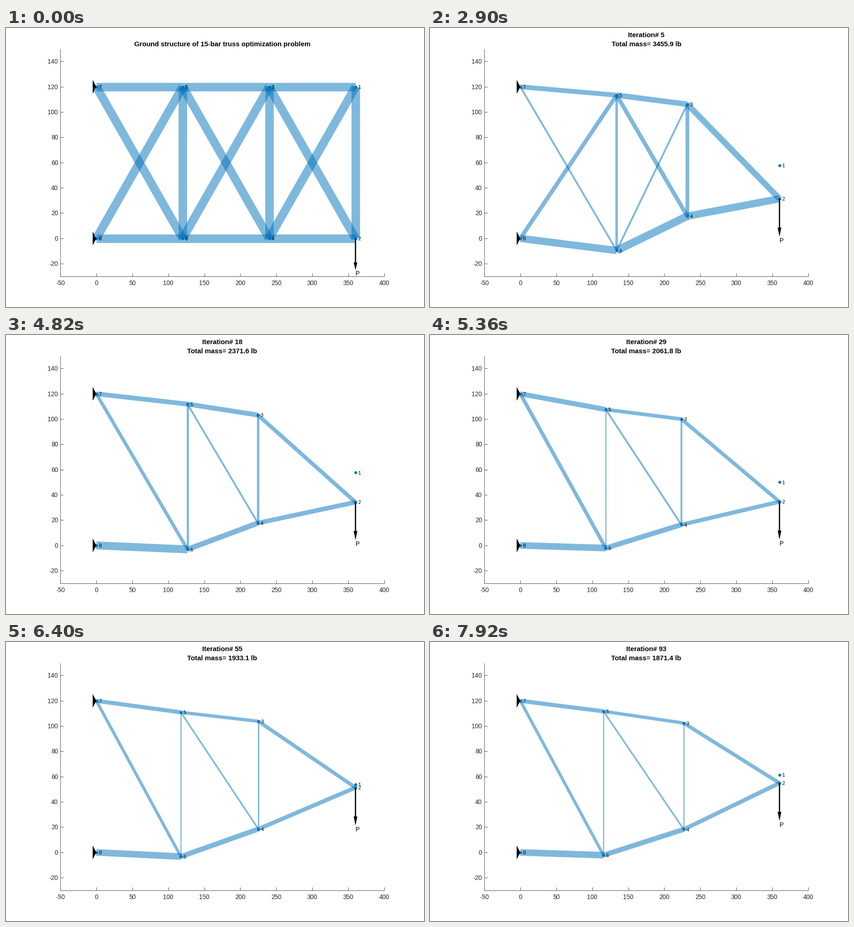
These frames come from a looping animation (916 px wide and 611 px high, 8000 ms). A matplotlib script:

```python
import numpy as np
import matplotlib.pyplot as plt
from matplotlib.animation import FuncAnimation
from matplotlib.collections import LineCollection
from matplotlib.patches import Polygon

W, H, DPI = 916, 611, 64
STEP, LOOP = 10, 8000
BLUE, GRAY = (0, 114 / 255, 189 / 255), (0.15, 0.15, 0.15)

# Plot box as fractions of the stage, and its data limits
LEFT, RIGHT = 0.13 * W, 0.905 * W
TOP, BOTTOM = 0.075 * H, 0.89 * H
X_MIN, X_MAX, Y_MIN, Y_MAX = -50, 400, -30, 150

BARS = [(7, 5), (5, 3), (8, 6), (6, 4), (4, 2), (5, 6), (3, 4), (7, 6),
        (8, 5), (5, 4), (6, 3), (3, 2), (3, 1), (1, 2), (4, 1)]

# Design stages: y1, y2, x3, y3, y4, x5, y5, y6
SHAPES = np.array([
    [50, 20, 220, 100, 20, 100, 125.3, -12],
    [57.9, 31.4, 231.9, 106.2, 17.6, 133.8, 113.4, -9.6],
    [61.8, 34, 224.8, 105, 18.4, 131, 114.2, -3.7],
    [50, 34.6, 223.7, 100, 16.4, 118.6, 107.6, -2.1],
    [53.8, 51.3, 225.1, 103.8, 18.5, 117.4, 110.9, -3.3],
    [61.3, 54.9, 227, 102.4, 18.2, 115.5, 111.7, -2.2],
])
# Line widths in pixels of the first twelve bars
WIDTHS = np.array([
    [9, 7, 9, 26.7, 8.6, 7, 2, 4, 9, 27, 4, 8.6],
    [10.5, 12, 16, 17, 16, 5.5, 8, 4, 9, 9, 4, 13],
    [10, 12, 19, 12, 10.5, 6, 6, 7, 0, 4, 0, 9],
    [11, 8, 14.5, 11, 9, 2.5, 4, 8, 0, 4, 0, 8],
    [9, 7.2, 14.5, 11, 9, 2.5, 3, 6.5, 0, 3.5, 0, 8],
    [9, 7.2, 14.5, 11, 9, 2.5, 2.5, 6.5, 0, 3.5, 0, 8],
])
MASSES = [127741.9, 3455.9, 2559.7, 2061.8, 1933.1, 1871.4]
ITERATIONS = [1, 5, 6, 11, 12, 29, 55, 93]
STAGES = [0, 1, 1, 2, 2, 3, 4, 5]

HOLDS = [1500, 500, 400, 300, 200] + [180] * 6 + list(range(150, 40, -10)) + [40] * 71
CHANGES = np.cumsum(HOLDS)


def pt(pixels):
    return pixels * 72 / DPI


def px(x):
    return LEFT + (x - X_MIN) / (X_MAX - X_MIN) * (RIGHT - LEFT)


def py(y):
    return BOTTOM - (y - Y_MIN) / (Y_MAX - Y_MIN) * (BOTTOM - TOP)


fig = plt.figure(figsize=(W / DPI, H / DPI), dpi=DPI, facecolor="white")
ax = fig.add_axes([0, 0, 1, 1])
ax.set(xlim=(0, W), ylim=(H, 0))
ax.axis("off")


def label(x, y, text="", size=13.6, ha="left", **style):
    return ax.text(x, y, text, fontsize=pt(size), ha=ha, va="baseline",
                   family="Liberation Sans", **style)


def draw_axes():
    tick = 7
    lines = [[(LEFT, TOP), (LEFT, BOTTOM)], [(LEFT, BOTTOM), (RIGHT, BOTTOM)]]
    for x in range(X_MIN, X_MAX + 1, 50):
        lines.append([(px(x), BOTTOM), (px(x), BOTTOM - tick)])
        label(px(x), 563, str(x), ha="center", color=GRAY)
    for y in range(-20, Y_MAX, 20):
        lines.append([(LEFT, py(y)), (LEFT + tick, py(y))])
        label(114, py(y) + 5, str(y), ha="right", color=GRAY)
    ax.add_collection(LineCollection(lines, colors=[GRAY], linewidths=pt(0.8)),
                      autolim=False)


def add_support(y):
    x = px(0)
    ax.add_patch(Polygon([(x - 8, y - 15), (x, y), (x - 8, y + 15)],
                         fc="black", ec="none", zorder=3))


draw_axes()
for support_y in (0, 120):
    add_support(py(support_y))

dots, = ax.plot([], [], "o", color=BLUE, ms=pt(6.4), mew=0, zorder=2)
bars = LineCollection([], colors=[BLUE], alpha=0.5, capstyle="butt", zorder=4)
ax.add_collection(bars, autolim=False)
arrow = Polygon([(0, 0)] * 3, fc="black", ec="none", zorder=5)
ax.add_patch(arrow)
names = {n: label(0, 0, str(n), 11, zorder=6) for n in range(1, 9)}
load_name = label(0, 0, "P", zorder=6)
center = (LEFT + RIGHT) / 2
title_top = label(center, 20, size=14.95, ha="center", weight="bold")
title_low = label(center, 40, size=14.95, ha="center", weight="bold")


def blend(rows, stage):
    i = min(int(stage), len(rows) - 2)
    return rows[i] + (rows[i + 1] - rows[i]) * (stage - i)


def design(iteration):
    """Node positions, bar widths and mass; iteration 0 is the ground structure."""
    if iteration == 0:
        nodes = {n: (360 - 120 * ((n - 1) // 2), 120 * (n % 2)) for n in range(1, 9)}
        return nodes, np.full(len(BARS), 18.67), None
    stage = np.interp(iteration, ITERATIONS, STAGES)
    y1, y2, x3, y3, y4, x5, y5, y6 = blend(SHAPES, stage)
    nodes = {1: (360, y1), 2: (360, y2), 3: (x3, y3), 4: (x3, y4),
             5: (x5, y5), 6: (x5, y6), 7: (0, 120), 8: (0, 0)}
    mass = np.exp(np.interp(stage, range(len(MASSES)), np.log(MASSES)))
    return nodes, blend(WIDTHS, stage), mass


def place_load(x, y, length):
    tip, neck = y + length, y + 0.76 * length
    shaft, head = 1.35, 4
    arrow.set_xy([(x - shaft, y), (x - shaft, neck), (x - head, neck), (x, tip),
                  (x + head, neck), (x + shaft, neck), (x + shaft, y)])
    load_name.set_position((x, y + 1.1 * length + 5))


def update(frame):
    iteration = int(np.searchsorted(CHANGES, frame * STEP, side="right"))
    nodes, widths, mass = design(iteration)
    spots = {n: (px(x), py(y)) for n, (x, y) in nodes.items()}

    shown = [(bar, w) for bar, w in zip(BARS, widths) if w > 1.9]
    bars.set_segments([[spots[a], spots[b]] for (a, b), _ in shown])
    bars.set_linewidths([pt(w) for _, w in shown])
    dots.set_data(*zip(*spots.values()))
    for n, (x, y) in spots.items():
        names[n].set_position((x + 5.5, y + 4.2))

    reach = 30 if iteration else 25
    place_load(*spots[2], py(0) - py(reach))
    if iteration:
        title_top.set_text(f"Iteration# {iteration}")
        title_low.set_text(f"Total mass= {mass:.1f} lb")
    else:
        title_top.set_text("")
        title_low.set_text("Ground structure of 15-bar truss optimization problem")
    return []


anim = FuncAnimation(fig, update, frames=LOOP // STEP, interval=STEP,
                     repeat=True, repeat_delay=0, cache_frame_data=False)
plt.show()
```
